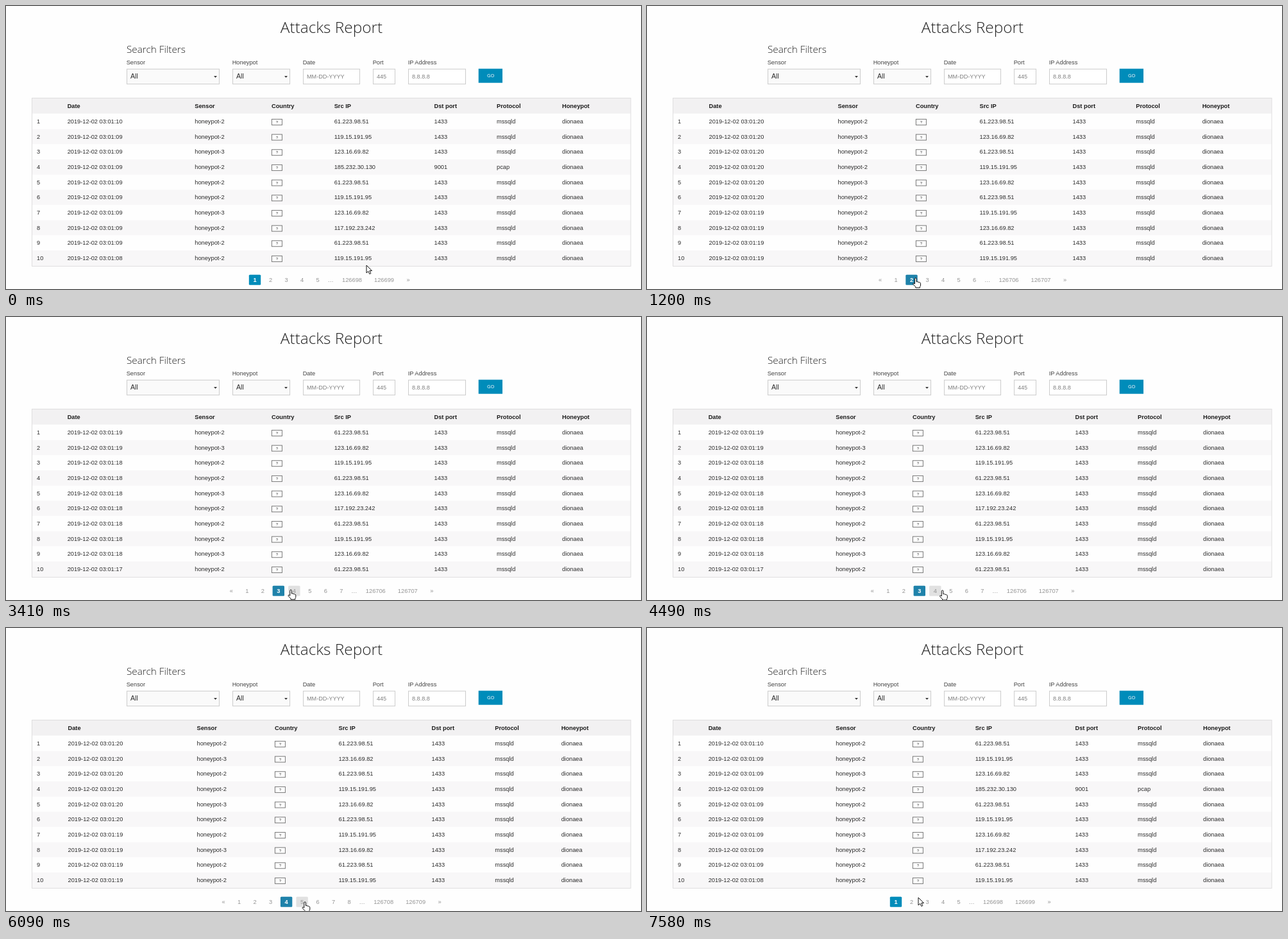
Recreate the animation shown at these times as an HTML page. Size 990 by 441 pixels, loop 7710 ms.

```html
<!DOCTYPE html>
<html lang="en">
<head>
<meta charset="utf-8">
<title>Attacks Report</title>
<style>
  html, body { margin: 0; width: 100%; height: 100%; overflow: hidden; background: #fefefe; }
  svg { display: block; font: 9.25px "Liberation Sans", Arial, sans-serif; fill: #2c2c2c; }
  .light { font-family: "Open Sans", sans-serif; font-weight: 300; fill: #222; }
  .bold { font-weight: bold; fill: #1c1c1c; }
  .label { fill: #444; }
  .hint { fill: #808080; }
  .pager { fill: #949494; text-anchor: middle; }
  .field { fill: #fff; stroke: #ccc; }
  .select { fill: #fafafa; stroke: #ccc; }
</style>
</head>
<body>
<svg width="990" height="441" viewBox="0 0 990 441">
  <g id="form"></g>
  <g id="view"></g>
  <path id="cursor" stroke="#111" stroke-width="1" stroke-linejoin="round" fill="#fff"/>
</svg>
<script>
const LOOP = 7710, ROW = 23.67, STEP = 24.5, RESET = 6360;
const $ = id => document.getElementById(id);

const text = (x, y, str, cls = '', size = 9.25) =>
  `<text x="${x}" y="${y}" class="${cls}" style="font-size:${size}px">${str}</text>`;
const rect = (x, y, w, h, attrs) =>
  `<rect x="${x}" y="${y}" width="${w}" height="${h}" ${attrs}/>`;

// Search form
const field = (x, w, label, hint) => text(x - .3, 91, label, 'label') +
  rect(x + .5, 98.3, w - 1, 23.3, 'class="field"') + text(x + 6, 113.4, hint, 'hint', 9.1);
const select = (x, w, label) => text(x - .3, 91, label, 'label') +
  rect(x + .5, 98.3, w - 1, 23.3, 'class="select"') + text(x + 6, 113, 'All', '', 10.6) +
  `<path d="M${x + w - 9} 109h5l-2.5 2.7z" fill="#333"/>`;

$('form').innerHTML =
  `<g text-anchor="middle">${text(507.5, 42.4, 'Attacks Report', 'light', 24.4)}</g>` +
  text(188, 73, 'Search Filters', 'light', 15.3) +
  select(188, 145, 'Sensor') + select(353, 90, 'Honeypot') +
  field(463, 89, 'Date', 'MM-DD-YYYY') + field(572, 35, 'Port', '445') +
  field(627, 90, 'IP Address', '8.8.8.8') +
  rect(736.7, 97.7, 37.3, 22, 'fill="#008cba"') +
  `<text x="755.7" y="111.2" text-anchor="middle" fill="#fff"
    style="font:7.6px 'Open Sans',sans-serif">GO</text>`;

// Table pages: ips holds one key per row, drops are the rows where the clock falls a second
const IPS = { a: '61.223.98.51', b: '119.15.191.95', c: '123.16.69.82',
              d: '185.232.30.130', e: '117.192.23.242' };
const HEADS = ['Date', 'Sensor', 'Country', 'Src IP', 'Dst port', 'Protocol', 'Honeypot'];
const WIDE = [95.7, 294.3, 414, 511.7, 667.5, 765, 867];
const TIGHT = [96.5, 297.5, 419, 518.5, 663.5, 762.3, 865.7];
const recent = { ips: 'acabcabcab', second: 20, drops: [6], cols: TIGHT };
const PAGES = [
  { ips: 'abcdabceab', second: 10, drops: [1, 9], cols: WIDE, total: 126699 },
  { ...recent, total: 126707 },
  { ips: 'acbaceabca', second: 19, drops: [2, 9], cols: WIDE, total: 126707 },
  { ...recent, total: 126709 },
];

function table({ ips, second, drops, cols }) {
  let out = rect(40.5, 143.5, 933.5, 24, 'fill="#f2f1f2"');
  HEADS.forEach((head, c) => out += text(cols[c], 158.5, head, 'bold'));
  [...ips].forEach((key, i) => {
    const y = 180 + i * ROW, base = y + 2.9;
    const sec = second - drops.filter(d => i >= d).length;
    const odd = key === 'd';
    if (i % 2) out += rect(41, y - 12, 933, ROW, 'fill="#f8f7f8"');
    out += text(48, base, i + 1);
    out += rect(cols[2] + .4, y - 3.6, 16, 9, 'fill="#fff" stroke="#777"');
    out += text(cols[2] + 6.8, y + 3, '?', '', 6);
    ['2019-12-02 03:01:' + String(sec).padStart(2, '0'),
     'honeypot-' + (key === 'c' ? 3 : 2), '', IPS[key],
     odd ? 9001 : 1433, odd ? 'pcap' : 'mssqld', 'dionaea']
      .forEach((cell, c) => out += text(cols[c], base, cell));
  });
  return out + rect(40.5, 143.5, 933.5, 262, 'fill="none" stroke="#dfdedf"');
}

const firstX = page => 388 - 12.2 * Math.max(0, page - 2);

function pager(page, hover) {
  const put = (x, str) => text(x, 430, str, 'pager');
  const { total } = PAGES[page - 1];
  const first = firstX(page), last = first + STEP * (page + 3);
  let out = page > 1 ? put(first - STEP, '«') : '';
  for (let n = 1; n <= page + 4; n++) {
    const x = first + STEP * (n - 1);
    const box = fill => rect(x - 9.2, 418.8, 18.4, 16, `rx="1.5" fill="${fill}"`);
    if (n === page) {
      out += box(page > 1 ? '#1f82aa' : '#008cba') +
        `<text x="${x}" y="430" text-anchor="middle" font-weight="bold" fill="#fff">${n}</text>`;
    } else {
      out += (n === hover ? box('#e1e1e1') : '') + put(x, n);
    }
  }
  return out + put(last + 20, '…') + put(last + 53.5, total - 1) +
    put(last + 103.5, total) + put(last + 141, '»');
}

// Cursor
const ARROW = 'M0 0V12L2.8 9.4L4.8 13.6L6.8 12.7L4.9 8.6H8.5Z';
const HAND = 'M-1.2 9V1.2a1.3 1.3 0 0 1 2.6 0V5.8q2.3-.7 2.6.5q1.9-.4 2.2.7q1.6-.1 1.6 1.4V11' +
  'q0 1.5-1 2.6V15H0V13.6L-3.8 9.6q-.5-1.7 1-1.6Z';
const PATH = [ // time, x, y of the tip
  [0, 562, 404], [210, 423, 420], [400, 421, 421], [460, 418, 424], [1470, 419, 424],
  [2070, 431, 426], [2450, 441, 425], [3220, 441, 425], [3880, 455, 426], [4290, 459, 426],
  [4480, 460.5, 426], [4690, 461, 426], [5090, 463, 427], [5280, 466, 427], [6950, 466, 427],
  [6951, 985, 436], [7300, 562, 404], [7560, 423, 420], [LOOP, 423, 420],
];

function tipAt(t) {
  const i = PATH.findIndex(k => k[0] > t);
  const [t0, x0, y0] = PATH[i - 1], [t1, x1, y1] = PATH[i];
  const p = (t - t0) / (t1 - t0);
  return [x0 + (x1 - x0) * p, y0 + (y1 - y0) * p];
}

function pageAt(t) {
  if (t >= RESET) return 1;
  return 1 + [1070, 3010, 4620].filter(load => t >= load).length;
}

let shown = '';
function draw() {
  const t = performance.now() % LOOP;
  const page = pageAt(t);
  const [x, y] = tipAt(Math.floor(t / 70) * 70); // the pointer is sampled every 70 ms
  const isHand = t >= 400 && t < RESET;
  const near = (x - firstX(page)) / STEP;
  const hover = isHand && Math.abs(near - Math.round(near)) < .48 ? Math.round(near) + 1 : 0;

  const state = page + '/' + hover;
  if (state !== shown) {
    $('view').innerHTML = table(PAGES[page - 1]) + pager(page, hover);
    shown = state;
  }
  const cursor = $('cursor');
  cursor.setAttribute('d', isHand ? HAND : ARROW);
  cursor.setAttribute('transform', `translate(${x} ${y})`);
  cursor.setAttribute('visibility', t >= RESET && t < 6960 ? 'hidden' : 'visible');
  requestAnimationFrame(draw);
}
draw();
</script>
</body>
</html>
```
